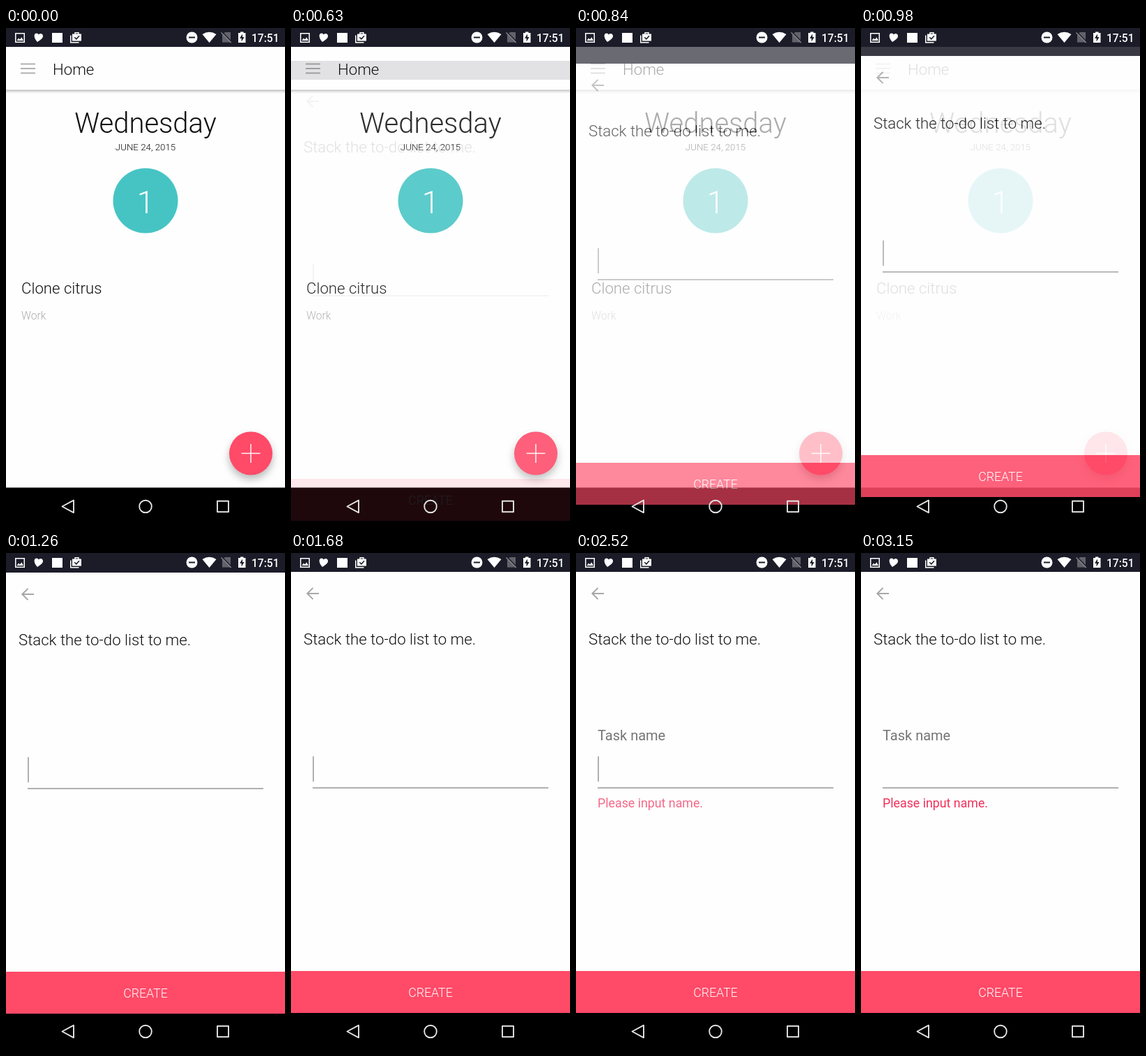
Recreate the animation shown at these times as an HTML page with a canvas. Size 400x711 px, loop 3220 ms.

```html
<!DOCTYPE html>
<html lang="en">
<head>
<meta charset="utf-8">
<title>To-do list</title>
<style>
html, body { margin: 0; width: 100%; height: 100%; overflow: hidden; background: #000; }
canvas { display: block; width: 400px; height: 711px; }
</style>
</head>
<body>
<canvas id="stage" width="400" height="711"></canvas>
<script>
const W = 400, H = 711, LOOP = 3220, STEP = 70;
const BAR = 27, NAV = 658;
const PINK = '#ff4a68', TEAL = '#46c4c4', DARK = '#1b1c28', PAPER = '#fefefe', GREY = '#b0b0b0';

const stage = document.getElementById('stage').getContext('2d');
const makeLayer = () => Object.assign(document.createElement('canvas'), { width: W, height: H }).getContext('2d');
const home = makeLayer(), form = makeLayer(), system = makeLayer();

const clamp = v => Math.max(0, Math.min(1, v));
const ramp = (t, a, b) => clamp((t - a) / (b - a));

function rect(c, color, x, y, w, h) {
  c.fillStyle = color;
  c.fillRect(x, y, w, h);
}

function disc(c, color, x, y, r) {
  c.fillStyle = color;
  c.beginPath();
  c.arc(x, y, r, 0, Math.PI * 2);
  c.fill();
}

function trace(c, pts, closed) {
  c.beginPath();
  pts.forEach(([x, y], i) => i ? c.lineTo(x, y) : c.moveTo(x, y));
  if (closed) c.closePath();
}

function poly(c, color, ...pts) {
  trace(c, pts, true);
  c.fillStyle = color;
  c.fill();
}

function line(c, color, width, ...pts) {
  trace(c, pts);
  c.strokeStyle = color;
  c.lineWidth = width;
  c.stroke();
}

function text(c, str, x, y, size, color, weight = 300, align = 'left') {
  c.font = `${weight} ${size}px Roboto, sans-serif`;
  c.textAlign = align;
  c.fillStyle = color;
  c.fillText(str, x, y);
}

function shadow(c, color, blur, y) {
  c.shadowColor = color;
  c.shadowBlur = blur;
  c.shadowOffsetY = y;
}

function drawHome(c) {
  rect(c, PAPER, 0, 0, W, NAV);
  c.save();
  shadow(c, 'rgba(0,0,0,.35)', 4, 1);
  rect(c, PAPER, -10, 0, W + 20, 88.5);
  c.restore();
  for (const y of [51.5, 58, 64.5]) line(c, GREY, 2, [21, y], [42, y]);
  text(c, 'Home', 67, 66.5, 22.2, '#111');

  text(c, 'Wednesday', 200, 149.5, 40, '#111', 300, 'center');
  text(c, 'JUNE 24, 2015', 200, 175, 13.3, '#111', 300, 'center');
  disc(c, TEAL, 200, 247, 46.5);
  text(c, '1', 200, 265, 44.4, '#fff', 300, 'center');
  text(c, 'Clone citrus', 22, 380, 22.2, '#111');
  text(c, 'Work', 22, 416.5, 15.6, '#aaa');

  c.save();
  shadow(c, 'rgba(0,0,0,.28)', 12, 6);
  disc(c, PINK, 351, 608.5, 31);
  c.restore();
  line(c, '#fff', 1.4, [337.5, 608.5], [364.5, 608.5]);
  line(c, '#fff', 1.4, [351, 595], [351, 622]);
  rect(c, '#000', 0, NAV - 0.5, W, H);
}

function drawForm(c, t) {
  c.clearRect(0, 0, W, H);
  rect(c, DARK, 0, 0, W, BAR);
  rect(c, PAPER, 0, BAR, W, NAV - BAR);
  line(c, '#a4a4a4', 1.9, [23.5, 58], [40, 58]);
  line(c, '#a4a4a4', 1.9, [31.5, 49.8], [23.3, 58], [31.5, 66.2]);
  text(c, 'Stack the to-do list to me.', 18, 130.5, 22.2, '#111');

  if (t < 2940) rect(c, GREY, 31, 291, 2, 36);
  rect(c, GREY, 31, 335, 338, 2);
  c.globalAlpha = ramp(t, 1750, 2030);
  text(c, 'Task name', 31, 267.5, 20, '#757575', 400);
  c.globalAlpha = ramp(t, 1960, 2730);
  text(c, 'Please input name.', 31, 363.5, 17.8, '#f2305a', 400);
  c.globalAlpha = 1;

  rect(c, PINK, 0, 598, W, 60);
  text(c, 'CREATE', 200, 635, 17.8, '#fff', 300, 'center');
  rect(c, '#000', 0, NAV, W, H - NAV);
}

function drawSystem(c) {
  const white = '#fff';
  rect(c, DARK, 0, 0, W, BAR);

  // picture
  c.strokeStyle = white;
  c.lineWidth = 1.5;
  c.strokeRect(13.75, 7.75, 12.5, 12.5);
  poly(c, white, [15.5, 18], [18, 14.5], [20, 16.5], [22.3, 13.3], [25, 18]);

  // heart
  c.fillStyle = white;
  c.beginPath();
  c.moveTo(45, 20);
  c.bezierCurveTo(40, 15, 39, 8, 43.5, 7.5);
  c.quadraticCurveTo(46, 7.5, 47, 9.5);
  c.bezierCurveTo(49, 7, 53, 8, 53, 11.5);
  c.bezierCurveTo(53, 15, 49, 17, 45, 20);
  c.fill();

  rect(c, white, 66, 7, 15, 14);

  // case with tick
  line(c, white, 1.5, [92.75, 10.5], [92.75, 20.75], [104.5, 20.75]);
  rect(c, white, 95, 8.5, 13, 10);
  line(c, white, 1.4, [99, 9], [99, 6.7], [104, 6.7], [104, 9]);
  line(c, DARK, 1.5, [98.3, 13.2], [100.8, 15.8], [105, 11.2]);

  // do not disturb
  disc(c, white, 266.5, 13.5, 8);
  rect(c, DARK, 262, 12.5, 9, 2);

  // wifi
  c.fillStyle = white;
  c.beginPath();
  c.moveTo(291.5, 21);
  c.lineTo(281.5, 9);
  c.quadraticCurveTo(291.5, 2.5, 301.5, 9);
  c.fill();

  // missing SIM
  poly(c, '#62626b', [310, 10], [314, 6], [322, 6], [322, 20.5], [310, 20.5]);
  line(c, DARK, 1.5, [310, 6], [324, 20]);
  line(c, '#85858c', 1.3, [308.5, 6.5], [322.8, 21]);

  // battery
  rect(c, white, 333, 7, 10.5, 14);
  rect(c, white, 336, 5.5, 4.5, 2);
  poly(c, DARK, [339, 8.5], [335, 14.8], [337.6, 14.8], [337.6, 19.5], [341.6, 13], [339, 13]);

  text(c, '17:51', 352, 19.5, 15.6, white, 500);

  // navigation keys
  c.strokeStyle = '#e4e4e4';
  c.lineWidth = 1.9;
  c.lineJoin = 'round';
  trace(c, [[80.5, 684.5], [97, 675.7], [97, 693.3]], true);
  c.stroke();
  c.beginPath();
  c.arc(200, 684.5, 8.8, 0, Math.PI * 2);
  c.stroke();
  c.strokeRect(303, 676.7, 16, 15.6);
}

function render(t) {
  stage.globalAlpha = 1;
  stage.drawImage(home.canvas, 0, 0);
  const alpha = 1 - (1 - ramp(t, 593, 1198)) ** 2;
  if (alpha > 0) {
    // the form slides up with a quadratic ease-out
    const dy = Math.round((0.0093 * Math.max(0, 1368 - t)) ** 2);
    drawForm(form, t);
    stage.globalAlpha = alpha;
    stage.drawImage(form.canvas, 0, dy);
    stage.globalAlpha = 1;
  }
  stage.drawImage(system.canvas, 0, 0);
}

drawHome(home);
drawSystem(system);

const start = performance.now();
function tick() {
  const t = Math.max(0, performance.now() - start) % LOOP;
  render(Math.floor(t / STEP) * STEP);
  requestAnimationFrame(tick);
}
tick();
</script>
</body>
</html>
```
